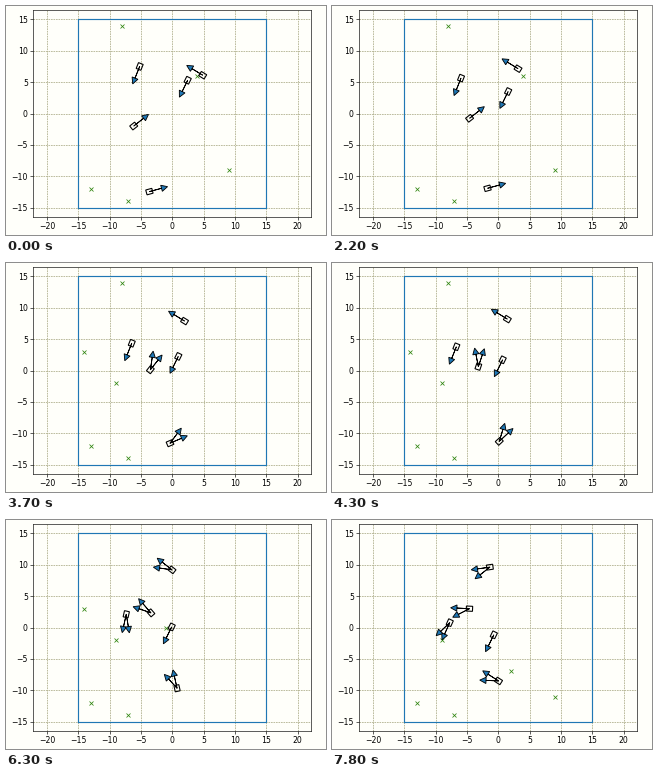
Write a matplotlib script that moves like this. It is 320 px wide and 229 px high and loops after 8 s.

```python
import numpy as np
import matplotlib.pyplot as plt
from matplotlib.animation import FuncAnimation

W, H, DPI = 320, 229, 100
FRAMES, TICK = 80, 100
SPEED, WHEELBASE, MAX_STEER = 0.2, 1.0, 30
SCALE = 0.56                    # the plot is shown smaller than default size
PAPER, BLUE, GREEN, GRID = "#fffffa", "#1f77b4", "#2f850f", "#b2b290"


class Car:
    """Bicycle model that chases a chain of goals, turning left to a new one."""

    def __init__(self, start, goals, dodges=None):
        self.start, self.goals, self.dodges = start, goals, dodges or {}

    def goal(self, k):
        return [point for first, point in self.goals if first <= k][-1]

    def bearing(self, x, y, k):
        gx, gy = self.goal(k)
        return np.degrees(np.arctan2(gy - y, gx - x))

    def pose(self, step):
        x, y = self.start
        heading, steer = self.bearing(x, y, 0), 0
        for k in range(1, step + 1):
            error = (self.bearing(x, y, k) - heading + 90) % 360 - 90
            steer = self.dodges.get(k, np.clip(error, -MAX_STEER, MAX_STEER))
            h = np.radians(heading)
            x += SPEED * np.cos(h)
            y += SPEED * np.sin(h)
            turn = SPEED / WHEELBASE * np.tan(np.radians(steer))
            heading += np.degrees(turn)
        return x, y, np.radians(heading), np.radians(steer)


cars = [
    Car((-5.2, 7.5), [(0, (-13, -12))], {28: 22, 29: 22, 36: -22}),
    Car((4.85, 6.1), [(0, (-8, 14)), (28, (-1, 0)), (33, (2, -7))],
        {27: -30, 28: -30}),
    Car((2.45, 5.3), [(0, (-7, -14))]),
    Car((-6.15, -2.0), [(0, (4, 6)), (16, (-9, -2))]),
    Car((-3.65, -12.45), [(0, (9, -9)), (16, (-14, 3)), (33, (9, -11))],
        {14: -30}),
]

plt.rcParams.update({"font.family": "DejaVu Sans", "font.size": 10 * SCALE,
                     "axes.linewidth": 0.8 * SCALE, "axes.facecolor": PAPER})
for axis in ("xtick", "ytick"):
    plt.rcParams.update({f"{axis}.major.size": 3.5 * SCALE,
                         f"{axis}.major.pad": 3.5 * SCALE,
                         f"{axis}.major.width": 0.8 * SCALE})

fig = plt.figure(figsize=(W / DPI, H / DPI), dpi=DPI, facecolor=PAPER)
ax = fig.add_axes([27.3 / W, 18 / H, 278 / W, 207 / H])
ax.set(xlim=(-22.16, 22.16), ylim=(-16.5, 16.5),
       xticks=range(-20, 21, 5), yticks=range(-15, 16, 5))
ax.set_axisbelow(True)
ax.grid(color=GRID, lw=0.6, ls=(0, (2, 1)))
ax.plot([-15, 15, 15, -15, -15], [-15, -15, 15, 15, -15],
        color=BLUE, lw=1.5 * SCALE)
marks, = ax.plot([], [], "x", color=GREEN, ms=6 * SCALE, mew=SCALE)

BOX = np.array([(-.5, -.4), (.5, -.4), (.5, .4), (-.5, .4)])
moving = []


def draw_arrow(x, y, angle):
    moving.append(ax.arrow(x, y, 2 * np.cos(angle), 2 * np.sin(angle),
                           head_width=1, head_length=1, fc=BLUE, ec="black",
                           lw=1.1 * SCALE, zorder=3))


def draw_car(x, y, heading, steer):
    draw_arrow(x, y, heading)
    if abs(steer) > 0.01:
        draw_arrow(x, y, heading + steer)
    c, s = np.cos(heading), np.sin(heading)
    corners = BOX @ np.array([(c, s), (-s, c)]) + (x, y)
    moving.extend(ax.fill(*corners.T, fc="none", ec="black",
                          lw=1.4 * SCALE, zorder=4))


def update(i):
    k = (5 * i + 8) // 11       # one step every 220 ms
    while moving:
        moving.pop().remove()
    marks.set_data(*zip(*(car.goal(k) for car in cars)))
    for car in cars:
        draw_car(*car.pose(k))
    return [marks, *moving]


anim = FuncAnimation(fig, update, frames=FRAMES, interval=TICK,
                     init_func=lambda: update(0), repeat=True, repeat_delay=0)
plt.show()
```
